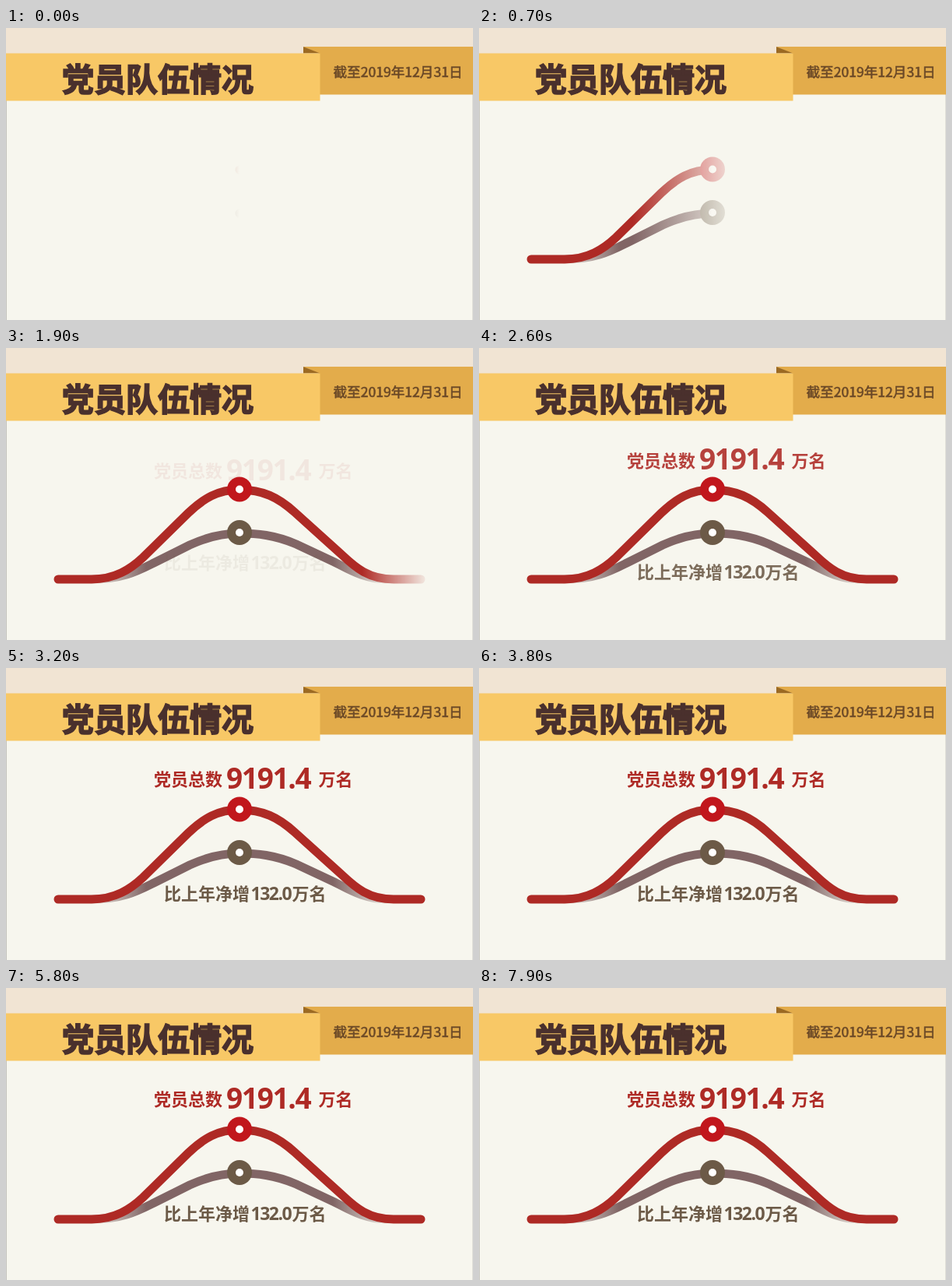
These frames come from a looping animation (600 by 375 pixels, 8 s). An HTML page:

```html
<!DOCTYPE html>
<html lang="zh-CN">
<head>
<meta charset="utf-8">
<title>党员队伍情况</title>
<style>
  html, body { margin: 0; width: 100%; height: 100%; overflow: hidden; background: #f7f6ee; }
  svg { display: block; width: 600px; height: 375px; }
  text { font-family: "Noto Sans CJK SC", "Noto Sans CJK", sans-serif; font-weight: 700; }
  .title { font-size: 41px; font-weight: 900; fill: #4a302d; stroke: #4a302d; stroke-width: 1.7px; }
  .date { font-size: 17.6px; font-weight: 400; fill: #6b4927; stroke: #6b4927; stroke-width: .6px; }
  .label { font-size: 22px; }
  .total, .gain { font-family: "Open Sans", "Noto Sans", sans-serif; }
  .total { font-size: 37px; letter-spacing: -1.3px; }
  .gain { font-size: 23px; letter-spacing: -1.5px; }
  .line { fill: none; stroke-width: 11; stroke-linecap: round; }
</style>
</head>
<body>
<svg viewBox="0 0 600 375">
  <defs>
    <linearGradient id="fadeL" gradientUnits="userSpaceOnUse" y1="0" y2="0">
      <stop stop-color="#fff"/><stop offset="1" stop-color="#000"/>
    </linearGradient>
    <linearGradient id="fadeR" href="#fadeL" gradientUnits="userSpaceOnUse" y1="0" y2="0"/>
    <linearGradient id="taupeL" gradientUnits="userSpaceOnUse" x1="110" y1="0" x2="180" y2="0">
      <stop stop-color="#816565" stop-opacity=".1"/><stop offset="1" stop-color="#816565"/>
    </linearGradient>
    <linearGradient id="taupeR" href="#taupeL" gradientUnits="userSpaceOnUse" x1="490" y1="0" x2="420" y2="0"/>
    <mask id="maskL" maskUnits="userSpaceOnUse" x="0" y="0" width="600" height="375">
      <rect width="600" height="375" fill="url(#fadeL)"/>
    </mask>
    <mask id="maskR" maskUnits="userSpaceOnUse" x="0" y="0" width="600" height="375">
      <rect width="600" height="375" fill="url(#fadeR)"/>
    </mask>
  </defs>

  <rect width="600" height="375" fill="#f7f6ee"/>
  <rect width="600" height="33" fill="#f1e4d3"/>
  <rect y="93" width="1" height="282" fill="#c6c5bf"/>
  <rect x="599" y="85" width="1" height="290" fill="#dddcd6"/>
  <path fill="#e3ac4b" d="M382 24H600V85.500H403V33Z"/>
  <path fill="#9c6a22" d="M382 24L403.500 32.500H382Z"/>
  <rect y="32.500" width="403.500" height="61" fill="#f8c866"/>
  <text class="title" x="72" y="81">党员队伍情况</text>
  <text class="date" x="420.500" y="62.800">截至2019年12月31日</text>

  <g class="line" mask="url(#maskR)">
    <path stroke="url(#taupeR)" d="M300 238C322 238 345 240 373 252L422 275C440 284 460 297 490 297"/>
    <path stroke="#ae2a25" d="M300 182C330 182 350 192 371 211L432 266C449 282 466 297 498 297H533"/>
  </g>
  <g mask="url(#maskL)">
    <g class="line">
      <path stroke="url(#taupeL)" d="M110 297C150 297 170 286 190 276L236 253C260 242 280 238 300 238"/>
      <path stroke="#ae2a25" d="M67 297H110C140 297 160 284 176 269L234 212C254 193 272 182 300 182"/>
    </g>
    <circle cx="300" cy="181.500" r="16" fill="#c1161c"/>
    <circle cx="300" cy="237" r="16" fill="#6c5a47"/>
    <g fill="#fff"><circle cx="300" cy="181.500" r="5"/><circle cx="300" cy="237" r="5"/></g>
  </g>

  <g id="top" fill="#ae2a25">
    <text class="label" x="190" y="151">党员总数</text>
    <text class="total" x="283" y="154.500">9191.4</text>
    <text class="label" x="401.500" y="151">万名</text>
  </g>
  <g id="bottom" fill="#6c5a47">
    <text class="label" x="203" y="298">比上年净增</text>
    <text class="gain" x="314.500" y="298">132.0</text>
    <text class="label" x="367.500" y="298">万名</text>
  </g>
</svg>
<script>
  const LOOP = 8000, STEP = 100;
  const el = id => document.getElementById(id);
  const progress = (t, from, to) => Math.min(1, Math.max(0, (t - from) / (to - from)));

  // Soft-edged wipe travelling from left to right
  function wipe(id, start, end, soft, p) {
    const lead = start + (end + soft - start) * p;
    el(id).setAttribute("x1", lead - soft);
    el(id).setAttribute("x2", lead);
  }

  function rise(id, dy, p) {
    el(id).setAttribute("opacity", p);
    el(id).setAttribute("transform", `translate(0 ${dy * (1 - p)})`);
  }

  function draw(t) {
    wipe("fadeL", 61, 316, 140, progress(t, 0, 1000));
    wipe("fadeR", 300, 539, 88, progress(t, 1000, 2200));
    const p = progress(t, 1840, 2700);
    rise("top", 16.5, p);
    rise("bottom", -14.8, p);
  }

  const begin = performance.now();
  function tick() {
    const t = (performance.now() - begin) % LOOP;
    draw(Math.floor(t / STEP) * STEP);
    requestAnimationFrame(tick);
  }
  tick();
</script>
</body>
</html>
```
